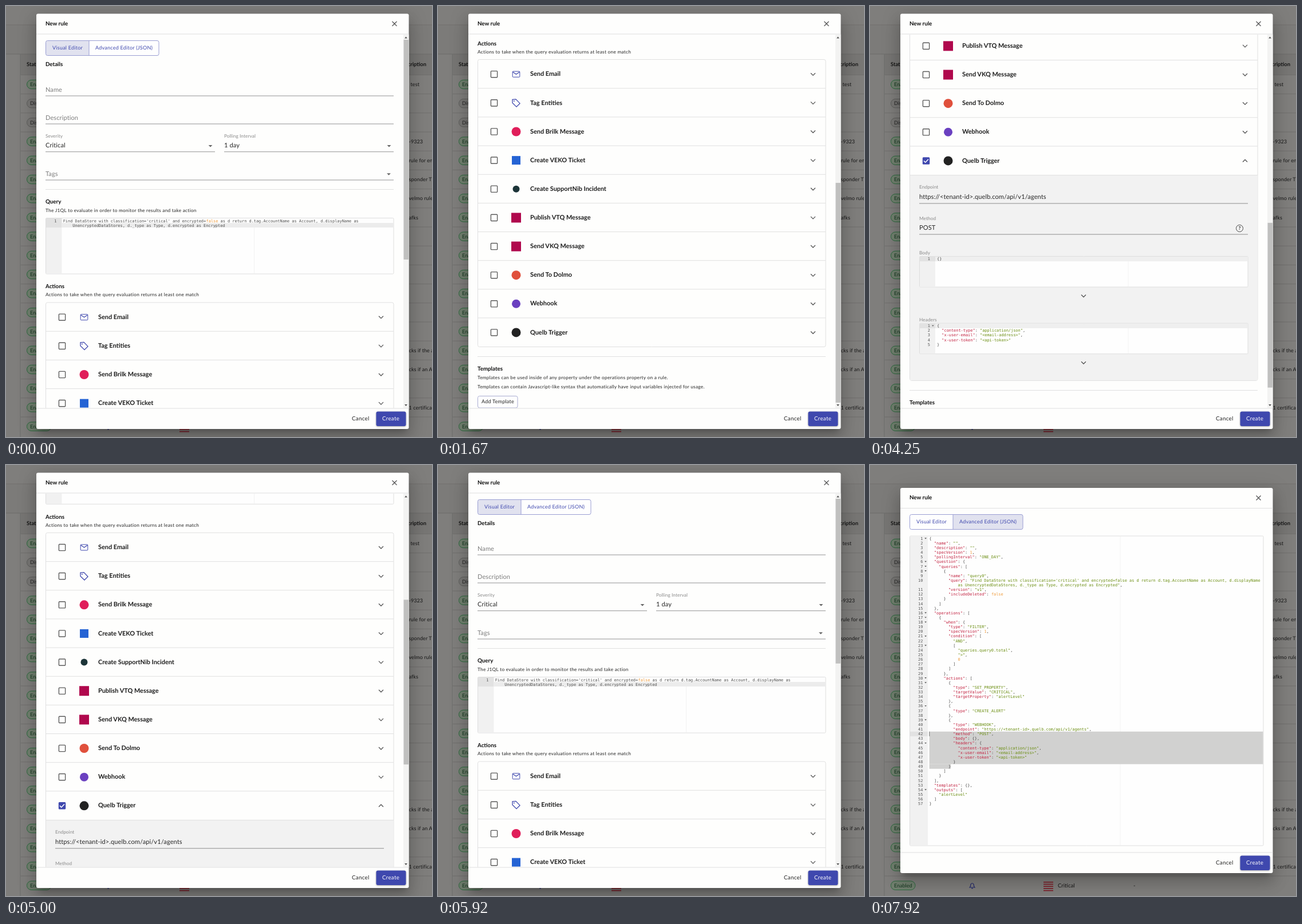
An HTML page with a canvas that plays this animation: 744x753 px, repeating every 8000 ms.

```html
<!DOCTYPE html>
<html lang="en">
<head>
<meta charset="utf-8">
<title>New rule</title>
<style>
  html, body { margin: 0; width: 100%; height: 100%; overflow: hidden; background: #7f7e7c; }
  canvas { display: block; width: 744px; height: 753px; }
</style>
</head>
<body>
<canvas id="stage"></canvas>
<script>
const W = 744, H = 753, LOOP = 8000;
const canvas = document.getElementById('stage');
const ctx = canvas.getContext('2d');
const dpr = window.devicePixelRatio || 1;
canvas.width = W * dpr;
canvas.height = H * dpr;

const SANS = 'Lato, sans-serif', MONO = '"DejaVu Sans Mono", monospace';
const INDIGO = '#3f48ae', INK = '#262626', GREY = '#8a8a8a', LINE = '#e0e0e0';
const RED = '#c2203f', GREEN = '#6a8d10', ORANGE = '#ee9a3a', CODE = '#4d4d4c';
const CH = 4.165, ROW = 8.13;          // editor character width and line height
const EXPAND = 359;                    // height of the open panel
const VIEW = { top: 50, bottom: 702 };

// Times of the hard changes
const T_OPEN = 3580, T_FILL = 3830, T_JSON = 6580, T_CLICK = 7350, T_DRAG = 7450;

// Scroll position: [time, offset]
const SCROLL = [[0, 0], [1250, 0], [1670, 424.5], [3580, 424.5], [3580, 640], [3750, 640],
  [4200, 724.5], [4450, 724.5], [5500, 105.5], [5680, 0], [LOOP, 0]];

const QUERY = "Find DataStore with classification='critical' and encrypted=false as d return " +
  'd.tag.AccountName as Account, d.displayName as UnencryptedDataStores, d._type as Type, d.encrypted as Encrypted';
const ENDPOINT = 'https://<tenant-id>.quelb.com/api/v1/agents';
const HEADERS = {
  'content-type': 'application/json',
  'x-user-email': '<email-address>',
  'x-user-token': '<api-token>'
};
const RULE = {
  name: '', description: '', specVersion: 1, pollingInterval: 'ONE_DAY',
  question: { queries: [{ name: 'query0', query: QUERY, version: 'v1', includeDeleted: false }] },
  operations: [{
    when: { type: 'FILTER', specVersion: 1, condition: ['AND', ['queries.query0.total', '>', 0]] },
    actions: [
      { type: 'SET_PROPERTY', targetValue: 'CRITICAL', targetProperty: 'alertLevel' },
      { type: 'CREATE_ALERT' },
      { type: 'WEBHOOK', endpoint: ENDPOINT, method: 'POST', body: {}, headers: HEADERS }
    ]
  }],
  templates: {}, outputs: ['alertLevel']
};

const ACTIONS = [
  ['Send Email', mailIcon],
  ['Tag Entities', tagIcon],
  ['Send Brilk Message', dot('#e01e5a', 8)],
  ['Create VEKO Ticket', block('#2563d4', 15)],
  ['Create SupportNib Incident', dot('#1c3438', 6)],
  ['Publish VTQ Message', block('#b0084d', 17)],
  ['Send VKQ Message', block('#b0084d', 17)],
  ['Send To Dolmo', dot('#e0503c', 8)],
  ['Webhook', dot('#6a40c0', 7.5)],
  ['Quelb Trigger', dot('#222', 8)]
];

const clamp = x => Math.max(0, Math.min(1, x));

function scrollAt(t) {
  for (let i = 1; i < SCROLL.length; i++) {
    const [t0, a] = SCROLL[i - 1], [t1, b] = SCROLL[i];
    if (t < t1) {
      const p = (t - t0) / (t1 - t0);
      return a + (b - a) * (t1 === 1670 ? p ** 3 : p);
    }
  }
  return 0;
}

// Drawing helpers; text is placed by the middle of its capitals
function text(s, x, y, size, color = INK, o = {}) {
  ctx.font = `${o.bold ? 700 : 400} ${size}px ${o.font || SANS}`;
  ctx.letterSpacing = (o.gap || 0) * size + 'px';
  ctx.textAlign = o.align || 'left';
  ctx.fillStyle = color;
  ctx.fillText(s, x, y + size * 0.355);
}
const field = (s, x, y, color) => text(s, x, y, 11.04, color, { gap: 0.0094 });
const label = (s, x, y) => text(s, x, y, 8.28, GREY, { gap: 0.0094 });
const note = (s, x, y) => text(s, x, y, 8.28, INK, { gap: 0.0333 });
const heading = (s, x, y) => text(s, x, y, 9.75, '#111', { bold: true });
const button = (s, x, y, size, color) => text(s, x, y, size, color, { gap: 0.0286 });
const mono = (s, x, y, color = CODE, align) => text(s, x, y, 6.92, color, { font: MONO, align });

function rect(x, y, w, h, color) {
  ctx.fillStyle = color;
  ctx.fillRect(x, y, w, h);
}
const hline = (x0, x1, y, color = LINE) => rect(x0, y - 0.5, x1 - x0, 1, color);

function box(x, y, w, h, r, fill, stroke) {
  ctx.beginPath();
  ctx.roundRect(x, y, w, h, r);
  if (fill) { ctx.fillStyle = fill; ctx.fill(); }
  if (stroke) { ctx.strokeStyle = stroke; ctx.lineWidth = 1; ctx.stroke(); }
}

function path(points, color, width = 1.2, close) {
  ctx.beginPath();
  points.forEach(([x, y]) => ctx.lineTo(x, y));
  if (close) ctx.closePath();
  ctx.strokeStyle = color;
  ctx.lineWidth = width;
  ctx.stroke();
}

function triangle(x, y, w, h, color) {
  ctx.beginPath();
  ctx.moveTo(x - w, y - h / 2);
  ctx.lineTo(x + w, y - h / 2);
  ctx.lineTo(x, y + h / 2);
  ctx.fillStyle = color;
  ctx.fill();
}

const chevron = (x, y, d = 1) => path([[x - 4, y - 2 * d], [x, y + 2 * d], [x + 4, y - 2 * d]], '#555', 1.3);

function circle(x, y, r, color) {
  ctx.beginPath();
  ctx.arc(x, y, r, 0, 7);
  ctx.fillStyle = color;
  ctx.fill();
}
function dot(color, r) { return (x, y) => circle(x, y, r, color); }
function block(color, s) { return (x, y) => rect(x - s / 2, y - s / 2, s, s, color); }

function mailIcon(x, y) {
  box(x - 6.3, y - 5, 12.6, 10, 1, null, INDIGO);
  path([[x - 6, y - 4], [x, y], [x + 6, y - 4]], INDIGO, 1.3);
}
function tagIcon(x, y) {
  path([[x - 6.5, y - 6], [x - 0.5, y - 6.5], [x + 6.5, y + 0.8], [x + 0.5, y + 6.8], [x - 6.5, y]], INDIGO, 1.3, true);
  circle(x - 3.6, y - 3.4, 1, INDIGO);
}
function bell(x, y) {
  ctx.beginPath();
  ctx.moveTo(x - 4.5, y + 3);
  ctx.lineTo(x - 3, y + 1);
  ctx.bezierCurveTo(x - 3.5, y - 6, x + 3.5, y - 6, x + 3, y + 1);
  ctx.lineTo(x + 4.5, y + 3);
  ctx.closePath();
  ctx.strokeStyle = '#23286a';
  ctx.lineWidth = 1.2;
  ctx.stroke();
  rect(x - 1.3, y + 4, 2.6, 1.3, '#23286a');
}

// Splits JSON into coloured runs, wrapping long lines at the given column
function layout(value, wrap = 140) {
  const runs = [], numbers = [];
  let row = 0;
  JSON.stringify(value, null, 2).split('\n').forEach(line => {
    const indent = line.search(/\S/);
    let col = 0;
    numbers.push({ row, fold: /[\[{]$/.test(line) });
    for (const [s, str, colon] of line.matchAll(/("[^"]*")(?=(:)?)|false|\d+|[^"\d f]+|\s+/g)) {
      const color = str ? (colon ? RED : GREEN) : /^(false|\d)/.test(s) ? ORANGE : CODE;
      let part = s;
      if (col + s.length > wrap) {
        const cut = s.lastIndexOf(' ', wrap - col);
        runs.push({ row, col, color, s: s.slice(0, cut) });
        part = s.slice(cut + 1);
        row++;
        col = indent + 4;
      }
      runs.push({ row, col, color, s: part });
      col += part.length;
    }
    row++;
  });
  return { runs, numbers };
}
const ruleCode = layout(RULE), headerCode = layout(HEADERS), emptyCode = layout({});

function code({ runs, numbers }, x, numX, y) {
  numbers.forEach((n, i) => {
    const cy = y + n.row * ROW;
    mono(i + 1, numX, cy, '#555', 'right');
    if (n.fold) triangle(numX + 4.8, cy, 1.8, 2.2, '#555');
  });
  runs.forEach(r => mono(r.s, x + r.col * CH, y + r.row * ROW, r.color));
}

function editorFrame(x, y, x1, y1, gutter, margin) {
  box(x, y, x1 - x, y1 - y, 1.5, '#fefefe', '#dedede');
  rect(x + 0.5, y + 0.5, gutter - x, y1 - y - 1, '#f1f1f1');
  rect(margin, y + 1, 1, y1 - y - 2, '#f1f1f1');
}

function backdrop() {
  rect(0, 0, W, H, '#7f7e7c');
  rect(0, 33, W, 51, '#7c7b79');
  rect(25, 84, W, 36.5, '#777674');
  hline(0, W, 33, '#72716f');
  hline(0, W, 84, '#6d6c6a');
  rect(24.5, 84, 1, H, '#6d6c6a');
  text('Status', 36, 101.5, 9.4, '#161616', { bold: true });
  text('Description', 734, 101.5, 9.4, '#161616', { bold: true, align: 'right' });
  const notes = { 3: '-9323', 4: 'rule for en', 5: 'sponder T', 6: 'velmo rule', 7: 'afks',
    14: 'cks if the a', 15: 'cks if an A', 17: '1 certificate' };
  for (let i = 0; i < 19; i++) {
    const y = 137 + i * 33.2, off = i === 1 || i === 2;
    hline(25, W, y - 16.6, '#706f6d');
    box(36.5, y - 7.7, off ? 45 : 42.5, 15.4, 7.7, off ? '#787775' : '#71806f', off ? '#5e5e5c' : '#2c6a3e');
    text(off ? 'Disabled' : 'Enabled', 42, y, 9, off ? '#222' : '#15351f');
    if (notes[i]) text(notes[i], 703.5, y, 9, '#161616', { gap: 0.01 });
  }
  text('test', 722, 137, 9, '#161616', { align: 'right', gap: 0.01 });
  bell(178.5, 735);
  for (let k = 0; k < 5; k++) rect(303, 728 + k * 3.7, 17, 1.5, '#7c1420');
  text('Critical', 328, 734.5, 9.5, '#161616');
  text('-', 460, 734.5, 9.5, '#161616');
}

function modal(top, bottom) {
  ctx.save();
  [[17, 26, 0.14, 2], [6, 32, 0.12, 5], [8, 10, 0.2, -5]].forEach(([dy, blur, a, grow]) => {
    ctx.shadowColor = `rgba(0,0,0,${a})`;
    ctx.shadowBlur = blur * dpr;
    ctx.shadowOffsetY = dy * dpr;
    box(53 - grow, top - grow, 650.5 + grow * 2, bottom - top + grow * 2, 3, null);
    // Only the shadow is kept: the shape itself is cast from off stage
    ctx.shadowOffsetX = 2000 * dpr;
    ctx.translate(-2000, 0);
    box(53 - grow, top - grow, 650.5 + grow * 2, bottom - top + grow * 2, 3, '#000');
    ctx.translate(2000, 0);
  });
  ctx.restore();
  box(53, top, 650.5, bottom - top, 3, '#fefefd');
  heading('New rule', 69, top + 17);
  const x = 678.5, y = top + 17.5;
  path([[x - 4, y - 4], [x + 4, y + 4]], '#555');
  path([[x - 4, y + 4], [x + 4, y - 4]], '#555');
  hline(53, 703.5, top + 35.5);
}

function footer(bottom) {
  hline(53, 703.5, bottom - 36);
  button('Cancel', 604, bottom - 18.5, 9.75, '#222');
  ctx.save();
  ctx.shadowColor = 'rgba(0,0,0,.35)';
  ctx.shadowBlur = 3 * dpr;
  ctx.shadowOffsetY = dpr;
  box(646.5, bottom - 30.5, 52, 25.5, 3, INDIGO);
  ctx.restore();
  button('Create', 657, bottom - 18.5, 9.75, '#fff');
}

function toggle(y, json, t) {
  const x = 69.5, mid = 145, right = 267;
  ctx.save();
  box(x, y, right - x, 26, 3, '#fefefe');
  ctx.clip();
  rect(json ? mid : x, y, json ? right - mid : mid - x, 26, '#e1e2ef');
  const age = t - 6500;
  if (age > 0 && age < 420) {
    const fade = 1 - clamp((age - 230) / 190);
    ctx.beginPath();
    ctx.rect(mid, y, right - mid, 26);
    ctx.clip();
    circle(208, y + 21.5, 12 + 0.25 * age, `rgba(63,72,176,${0.27 * fade})`);
  }
  ctx.restore();
  box(x, y, right - x, 26, 3, null, '#9a9ed3');
  rect(mid - 0.5, y, 1, 26, '#9a9ed3');
  button('Visual Editor', 81, y + 12.5, 8.97, INDIGO);
  button('Advanced Editor (JSON)', 156, y + 12.5, 8.97, INDIGO);
}

function smallEditor(name, y, content) {
  label(name, 86, y - 6.5);
  editorFrame(86.5, y, 660, y + 53.5, 113.5, 450.5);
  rect(87, y + 0.5, 27, ROW, '#e2e2e2');
  rect(114, y + 0.5, 545.5, ROW, '#efefef');
  code(content, 117, 105, y + 4.5);
  chevron(373, y + 69);
}

function panel(c, filled) {
  const ink = filled ? INK : '#8f8f8f';
  rect(70, c + 25.6, 606.5, EXPAND - 0.5, '#f2f2f2');
  hline(70, 677, c + 25.6);
  if (filled) label('Endpoint', 86, c + 46.5);
  field(filled ? ENDPOINT : 'Endpoint', 86, c + 63.3, ink);
  hline(86, 660, c + 75, filled ? '#8c8c8c' : '#b5b5b5');
  label('Method', 86, c + 101.3);
  field('POST', 86, c + 117.3, ink);
  hline(86, 660, c + 129, filled ? '#8c8c8c' : '#b5b5b5');
  box(639.5, c + 112.5, 12, 12, 6, null, '#444');
  text('?', 645.5, c + 118.5, 8.5, '#333', { bold: true, align: 'center' });
  smallEditor('Body', c + 167.5, emptyCode);
  smallEditor('Headers', c + 284.3, filled ? headerCode : emptyCode);
}

function checkbox(x, y, on) {
  if (!on) {
    ctx.beginPath();
    ctx.roundRect(x - 5.6, y - 5.6, 11.2, 11.2, 1);
    ctx.strokeStyle = '#5c5c5c';
    ctx.lineWidth = 1.4;
    ctx.stroke();
    return;
  }
  box(x - 6.2, y - 6.2, 12.4, 12.4, 1.5, INDIGO);
  path([[x - 4, y], [x - 1.3, y + 2.8], [x + 4, y - 2.8]], '#fff', 1.5);
}

function form(open, filled) {
  const extra = open ? EXPAND : 0;
  heading('Details', 69, 102);
  [['Name', 146], ['Description', 195], ['Tags', 293]].forEach(([s, y]) => {
    field(s, 69, y, '#7d7d7d');
    hline(69, 677, y + 11, '#949494');
  });
  [['Severity', 'Critical', 69], ['Polling Interval', '1 day', 381]].forEach(([s, v, x]) => {
    label(s, x, 227.3);
    field(v, x, 243.5);
    hline(x, x + 296, 254.7, '#949494');
    triangle(x + 288, 244.7, 3.4, 3.4, '#666');
  });
  triangle(668.5, 294, 3.4, 3.4, '#666');
  hline(69, 677, 320.5);

  heading('Query', 69, 342);
  note('The J1QL to evaluate in order to monitor the results and take action', 69, 357);
  editorFrame(69.5, 370.5, 677, 468, 97, 433);
  rect(70, 371, 27.5, 16, '#e2e2e2');
  rect(97.5, 379, 579, 8, '#ececec');
  mono('1', 88.5, 375.3, '#555', 'right');
  const cut = QUERY.indexOf('Unencrypted'), at = QUERY.indexOf('false');
  [[0, at, CODE], [at, at + 5, ORANGE], [at + 5, cut, CODE]].forEach(([a, b, color]) =>
    mono(QUERY.slice(a, b), 99.7 + a * CH, 375.3, color));
  mono(QUERY.slice(cut), 99.7 + 4 * CH, 383.3);

  heading('Actions', 69, 490);
  note('Actions to take when the query evaluation returns at least one match', 69, 504.5);
  box(69.5, 518, 607.5, 502 + extra, 3, '#fefefd', LINE);
  ACTIONS.forEach(([name, icon], i) => {
    const c = 543.2 + i * 50.14, last = i === 9;
    if (i) hline(70, 677, c - 25);
    checkbox(98, c + 0.5, last && filled);
    icon(136.5, c + 0.5);
    text(name, 161, c - 0.2, 10.9, '#1c1c1c', { bold: true });
    if (last && open) panel(c, filled);
    chevron(655, c + 0.5, last && open ? -1 : 1);
  });

  ctx.translate(0, extra);
  hline(69, 677, 1037);
  heading('Templates', 69, 1058.5);
  note('Templates can be used inside of any property under the operations property on a rule.', 69, 1074);
  note('Templates can contain Javascript-like syntax that automatically have input variables injected for usage.', 69, 1090);
  box(69.5, 1106, 69.5, 20.5, 3, '#fefefe', '#a9acd2');
  button('Add Template', 76, 1115.5, 8.97, '#222');
}

function scrollbar(pos, open) {
  const total = 1075 + (open ? EXPAND : 0), track = 633;
  rect(694, 50, 9.5, 652.5, '#f3f3f2');
  rect(694.5, 59 + track * pos / total, 8.5, track * 652 / total, '#c0c0bf');
  triangle(698.5, 55, 2.4, -2.8, '#505050');
  triangle(698.5, 697.5, 2.4, 2.8, '#505050');
}

function visualEditor(t) {
  const open = t >= T_OPEN, pos = scrollAt(t);
  modal(13.5, 739);
  ctx.save();
  ctx.beginPath();
  ctx.rect(53, VIEW.top, 650.5, VIEW.bottom - VIEW.top + 0.5);
  ctx.clip();
  ctx.translate(0, -pos);
  toggle(60.5, false, t);
  form(open, t >= T_FILL);
  ctx.restore();
  scrollbar(pos, open);
  footer(739);
}

function jsonEditor(t) {
  const y0 = 128.3, x0 = 103.6, right = 686.5;
  modal(40, 713);
  toggle(86.5, true, t);
  editorFrame(69.5, 124, 687, 665, 100.5, 436.5);
  const first = Math.round(49 - 7 * clamp((t - T_DRAG) / 430));
  const active = t < T_CLICK ? 57 : first;
  const top = row => y0 + row * ROW - ROW / 2;
  rect(70, top(active), 31, ROW, '#e2e2e2');
  if (t < T_DRAG) rect(101, top(active), right - 101, ROW, '#ebebeb');
  if (first < 49) {
    rect(x0, top(first), right - x0, (49 - first) * ROW, '#d1d1d0');
    rect(x0, top(49), 9 * CH, ROW, '#d1d1d0');
  }
  code(ruleCode, x0, 92.3, y0);
  if (first < 49) rect(x0 - 0.3, top(first), 1, ROW, '#777');
  footer(713);
}

function draw(now) {
  const t = now % LOOP;
  ctx.setTransform(dpr, 0, 0, dpr, 0, 0);
  ctx.textRendering = 'geometricPrecision';
  backdrop();
  (t < T_JSON ? visualEditor : jsonEditor)(t);
  requestAnimationFrame(tick);
}

const start = performance.now();
function tick() { draw(performance.now() - start); }
tick();
</script>
</body>
</html>
```
